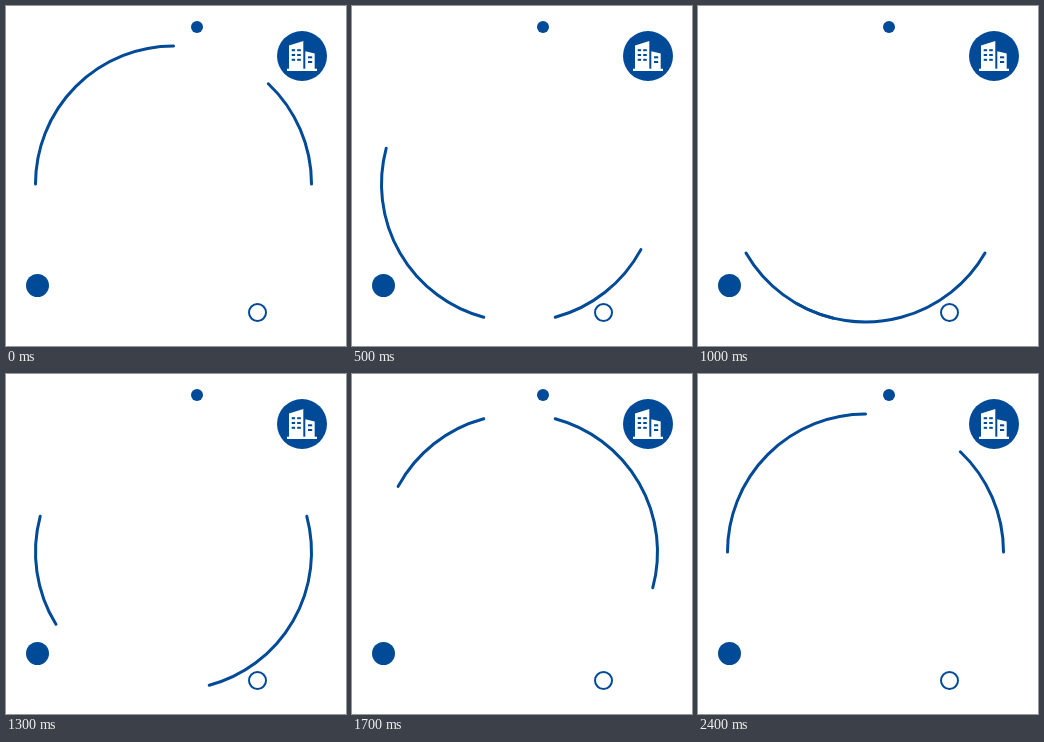
Write an HTML page with a canvas that moves like this. It is 340x340 px and loops after 2500 ms.

```html
<!DOCTYPE html>
<html lang="en">
<head>
<meta charset="utf-8">
<title>Orbit arcs</title>
<style>
  html, body { margin: 0; width: 100%; height: 100%; overflow: hidden; background: #fff; }
  canvas { display: block; width: 340px; height: 340px; }
</style>
</head>
<body>
<canvas id="stage"></canvas>
<script>
const SIZE = 340, LOOP = 2500, STEP = 100, TURN = 15;
const BLUE = '#004a97', WHITE = '#fff';
const CX = 167.5, CY = 178, RADIUS = 138;

const canvas = document.getElementById('stage');
const ctx = canvas.getContext('2d');
const ratio = window.devicePixelRatio || 1;
canvas.width = canvas.height = SIZE * ratio;
ctx.scale(ratio, ratio);
ctx.lineCap = 'round';

const rad = deg => deg * Math.PI / 180;

function disc(x, y, r) {
  ctx.fillStyle = BLUE;
  ctx.beginPath();
  ctx.arc(x, y, r, 0, Math.PI * 2);
  ctx.fill();
}

function arc(x, y, r, from, to, width) {
  ctx.strokeStyle = BLUE;
  ctx.lineWidth = width;
  ctx.beginPath();
  ctx.arc(x, y, r, rad(from), rad(to));
  ctx.stroke();
}

function shape(points) {
  ctx.beginPath();
  points.forEach(([x, y]) => ctx.lineTo(x, y));
  ctx.fill();
}

function badge() {
  disc(296, 50, 25);
  ctx.fillStyle = WHITE;
  shape([[283, 39.5], [297.3, 35], [297.3, 63], [283, 63]]);
  shape([[299.3, 45.2], [308.7, 47.6], [308.7, 63], [299.3, 63]]);
  ctx.fillRect(281, 62.7, 30, 2.3);
  ctx.fillStyle = BLUE;
  for (const y of [43.2, 48, 52.8]) {
    ctx.fillRect(285.7, y, 3.4, 2);
    ctx.fillRect(291.2, y, 3.6, 2);
  }
  for (const y of [50.3, 55]) ctx.fillRect(302, y, 4.2, 2);
}

function draw(now) {
  const turn = Math.floor(now % LOOP / STEP) * TURN;
  ctx.fillStyle = WHITE;
  ctx.fillRect(0, 0, SIZE, SIZE);

  // The long arc turns counterclockwise, the short one clockwise.
  arc(CX, CY, RADIUS, 180 - turn, 270 - turn, 3);
  arc(CX, CY, RADIUS, 313.4 + turn, 360 + turn, 3);

  disc(191, 21, 6);
  disc(31.5, 279.5, 11.5);
  arc(251.5, 306.5, 8.5, 0, 360, 2);
  badge();
}

const start = performance.now();
function tick() {
  draw(performance.now() - start);
  requestAnimationFrame(tick);
}
tick();
</script>
</body>
</html>
```
